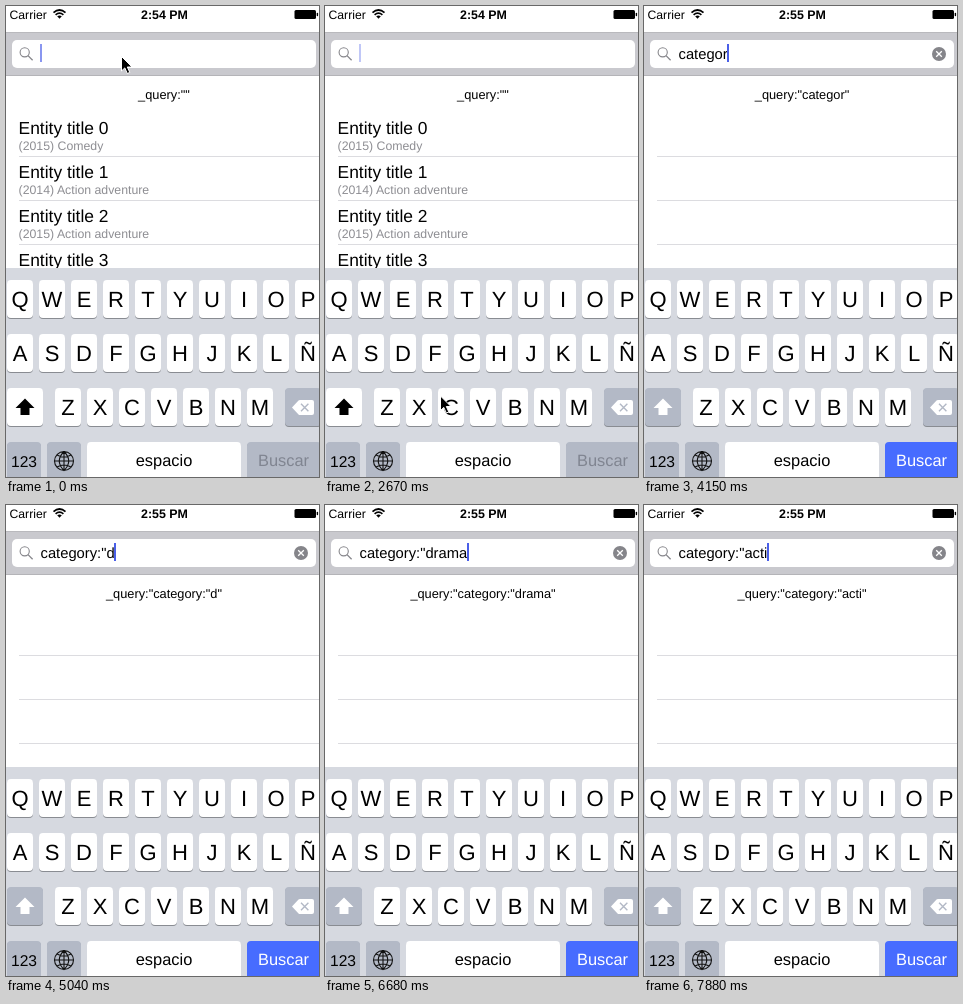
Write an HTML page that moves like this. It is 313 px wide and 471 px high and loops after 8 s.

```html
<!DOCTYPE html>
<html lang="es">
<head>
<meta charset="utf-8">
<title>Search keyboard</title>
<style>
  html, body { margin: 0; width: 100%; height: 100%; overflow: hidden; background: #fff; }
  svg { display: block; width: 313px; height: 471px; }
  text { font-family: "Liberation Sans", Arial, sans-serif; text-rendering: geometricPrecision; }
</style>
</head>
<body>
<svg id="stage" viewBox="0 0 313 471" xmlns="http://www.w3.org/2000/svg"></svg>
<script>
const LOOP = 8000;
const GREY_KEY = '#b3b9c6';
const stage = document.getElementById('stage');

function add(tag, attrs, parent = stage) {
  const el = document.createElementNS('http://www.w3.org/2000/svg', tag);
  for (const k in attrs) el.setAttribute(k, attrs[k]);
  parent.appendChild(el);
  return el;
}
const rect = (x, y, width, height, fill, rx = 0, parent) =>
  add('rect', { x, y, width, height, fill, rx }, parent);
const path = (d, attrs, parent) => add('path', { d, fill: 'none', ...attrs }, parent);
function text(str, x, y, size, attrs = {}, parent) {
  const el = add('text', { x, y, 'font-size': size, ...attrs }, parent);
  el.textContent = str;
  return el;
}
const MID = { 'text-anchor': 'middle' };

// Status bar
text('Carrier', 3.5, 12.5, 12.2);
const clock = text('2:54 PM', 158.5, 12.5, 12.4, { ...MID, 'font-weight': 'bold' });
path('M47.5 6.6 Q53.5 1.4 59.5 6.6 M49.6 8.9 Q53.5 5.4 57.4 8.9', { stroke: '#000', 'stroke-width': 1.7 });
path('M51.2 10.3 Q53.5 8.6 55.8 10.3 L53.5 12.8 Z', { fill: '#000' });
rect(288.5, 4, 21.5, 9, '#000', 1.5);
rect(310.7, 6.8, 1.4, 3.4, '#000', 0.7);

// Search bar
rect(0, 26, 313, 44, '#c9c9ce');
rect(0, 26, 313, 1, '#b9b9bd');
rect(0, 69, 313, 1, '#b4b4b8');
rect(6, 34, 304, 28, '#fff', 5);
add('circle', { cx: 18.7, cy: 46.3, r: 4.6, fill: 'none', stroke: '#85858a', 'stroke-width': 1.1 });
path('M22 49.6 L26.6 54.2', { stroke: '#85858a', 'stroke-width': 1.3 });
const field = text('', 34.5, 52.5, 14.75);
const caret = rect(34, 38, 2, 18, '#4a5fe8');
const clear = add('g', {});
add('circle', { cx: 295, cy: 48, r: 7, fill: '#85858a' }, clear);
path('M292.2 45.2 L297.8 50.8 M297.8 45.2 L292.2 50.8', { stroke: '#fff', 'stroke-width': 1.3 }, clear);

// Result list
const label = text('', 158, 93, 12.8, MID);
const rows = [0, 1, 2, 3].map(i => {
  const y = 106 + i * 44;
  if (i < 3) rect(13, y + 44, 300, 1, '#dcdce0');
  return {
    title: text('', 12.6, y + 22, 17.4),
    info: text('', 12.6, y + 38.3, 12.3, { fill: '#8e8e93' })
  };
});

// Keyboard
rect(0, 262, 313, 209, '#d6d9e0');
function key(x, y, w, fill = '#fff') {
  rect(x, y + 1, w, 38, '#898c92', 4);
  return rect(x, y, w, 38, fill, 4);
}
['QWERTYUIOP', 'ASDFGHJKLÑ', 'ZXCVBNM'].forEach((letters, r) => {
  [...letters].forEach((ch, i) => {
    const x = (r === 2 ? 49 : 1) + i * 32, y = 274 + r * 54;
    key(x, y, 26);
    text(ch, x + 13, y + 27.3, 22, MID);
  });
});

const shift = key(1, 382, 36);
const arrow = path('M19 392.5 L28.5 402 H23.5 V409 H14.5 V402 H9.5 Z', { 'stroke-linejoin': 'round' });

key(279, 382, 36, GREY_KEY);
path('M286 401.5 L292.5 394.5 Q293 394 294 394 H306 Q308 394 308 396 V407 Q308 409 306 409 H294 Q293 409 292.5 408.5 Z', { fill: '#fff' });
path('M295 397.8 L302.4 405.2 M302.4 397.8 L295 405.2', { stroke: GREY_KEY, 'stroke-width': 1.4 });

key(1, 436, 34, GREY_KEY);
text('123', 18, 461, 15.6, MID);
key(41, 436, 34, GREY_KEY);
path('M48.5 455 a9.5 9.5 0 1 0 19 0 a9.5 9.5 0 1 0 -19 0 H67.5 M58 445.5 V464.5 ' +
  'M58 445.5 Q48.5 455 58 464.5 Q67.5 455 58 445.5 M51 449 Q58 453 65 449 M51 461 Q58 457 65 461',
  { stroke: '#111', 'stroke-width': 1.1 });
key(81, 436, 154);
text('espacio', 158, 460, 16.4, MID);
const go = key(241, 436, 74);
const goText = text('Buscar', 277.5, 460, 16.4, MID);

const mouse = path('M0 0 V14.5 L3.3 11.4 L5.8 17 L8.3 15.9 L5.8 10.5 H10.5 Z',
  { fill: '#000', stroke: '#fff', 'stroke-width': 1 });

// Times in ms
const TYPED = [
  [0, ''], [2820, 'c'], [3110, 'cat'], [3260, 'cate'], [3860, 'categ'], [4000, 'catego'],
  [4150, 'categor'], [4300, 'category'], [4740, 'category:"'], [5040, 'category:"d'],
  [5190, 'category:"dr'], [5340, 'category:"dra'], [5480, 'category:"drama'],
  [5780, 'category:"drama"'], [6680, 'category:"drama'], [6830, 'category:"dram'],
  [6980, 'category:"dra'], [7130, 'category:"dr'], [7280, 'category:"d'],
  [7430, 'category:"'], [7580, 'category:"ac'], [7880, 'category:"acti']
];
const CARET = [
  [0, 0.65], [150, 1], [600, 0.35], [740, 0], [1040, 0.65], [1190, 1], [1630, 0.35],
  [1780, 0], [2080, 0.65], [2230, 1], [2670, 0.35], [2820, 1], [6230, 0.35], [6380, 0], [6680, 1]
];
const MOUSE_Y = [[0, 50.5], [2230, 220], [2370, 390], [2820, -50]];

const ALL = [
  ['0', '(2015) Comedy'], ['1', '(2014) Action adventure'],
  ['2', '(2015) Action adventure'], ['3', '']
];
const DRAMA = [['9', '(2014) Drama'], ['10', '(2012) Drama'], ['11', '(2014) Drama'], ['13', '']];

const at = (steps, t) => steps.reduce((v, s) => (s[0] <= t ? s[1] : v), steps[0][1]);

let shown = null;
function showQuery(q) {
  if (q === shown) return;
  shown = q;
  const done = /"\w+"$/.test(q);
  const list = q === '' ? ALL : done ? DRAMA : [];
  field.textContent = q;
  label.textContent = done ? `_query:"", ${q}` : `_query:"${q}"`;
  rows.forEach((row, i) => {
    const [n, info] = list[i] || ['', ''];
    row.title.textContent = n && `Entity title ${n}`;
    row.info.textContent = info;
  });
  caret.setAttribute('x', 34 + Math.round(q ? field.getComputedTextLength() : 0));
  clock.textContent = q ? '2:55 PM' : '2:54 PM';
  clear.setAttribute('opacity', q ? 1 : 0);
  shift.setAttribute('fill', q ? GREY_KEY : '#fff');
  arrow.setAttribute('fill', q ? '#fff' : '#000');
  go.setAttribute('fill', q ? '#476cff' : GREY_KEY);
  goText.setAttribute('fill', q ? '#fff' : '#808591');
}

function draw(now) {
  const t = now % LOOP;
  showQuery(at(TYPED, t));
  caret.setAttribute('opacity', at(CARET, t));
  mouse.setAttribute('transform', `translate(115.5 ${at(MOUSE_Y, t)})`);
}

const start = performance.now();
function tick() {
  draw(performance.now() - start);
  requestAnimationFrame(tick);
}
draw(0);
requestAnimationFrame(tick);
</script>
</body>
</html>
```
